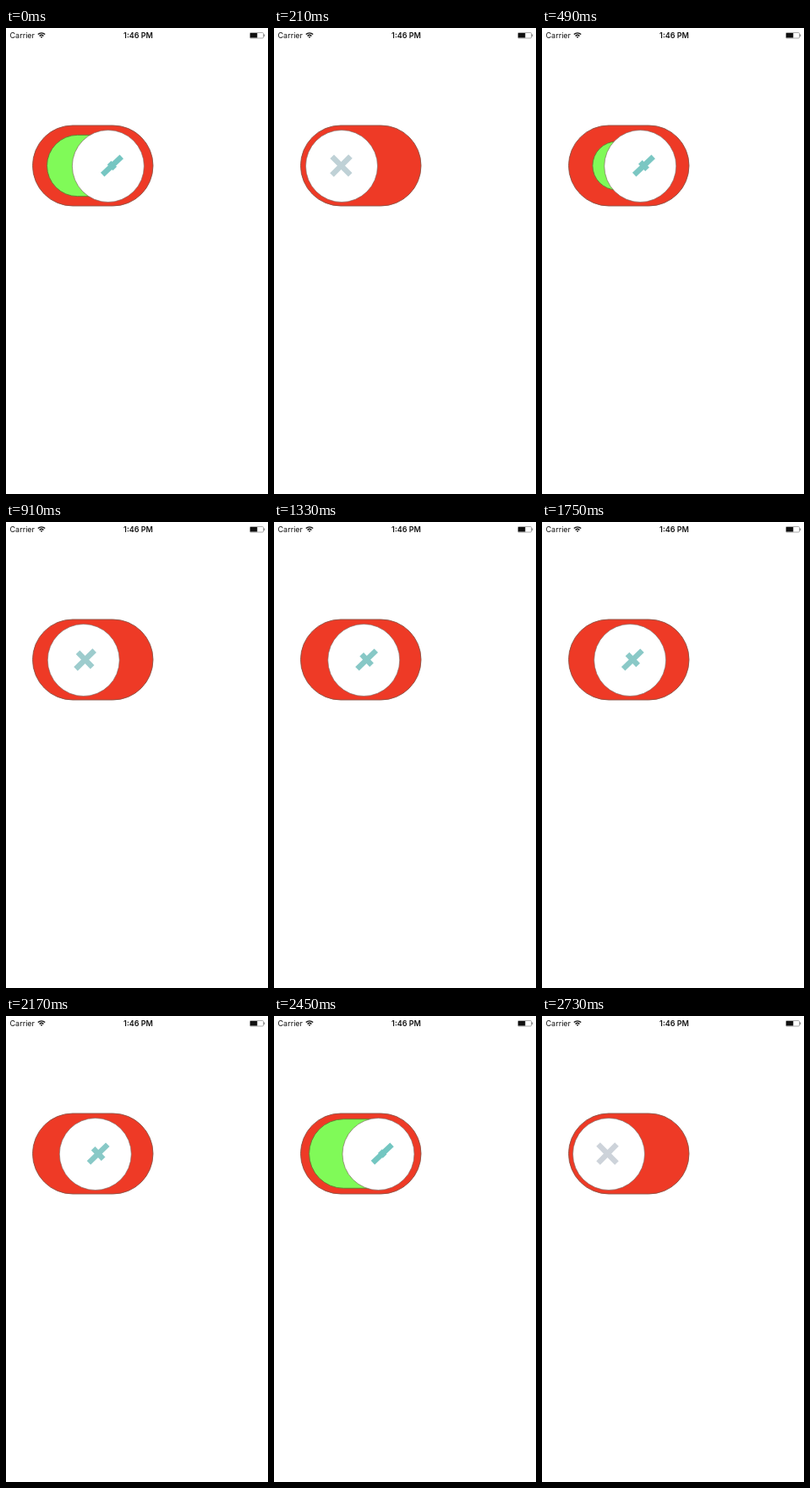
Recreate the animation shown at these times as an HTML page. Size 310 by 550 pixels, loop 2800 ms.

```html
<!DOCTYPE html>
<html lang="en">
<head>
<meta charset="utf-8">
<title>Toggle switch</title>
<style>
  html, body { margin: 0; width: 100%; height: 100%; overflow: hidden; background: #fff; }
  svg { display: block; }
  text { font: 9px Inter, sans-serif; fill: #111; }
</style>
</head>
<body>
<svg width="310" height="550" viewBox="0 0 310 550">
  <text x="4.5" y="12">Carrier</text>
  <text x="156.5" y="12" text-anchor="middle" style="font-weight:600">1:46 PM</text>
  <g fill="none" stroke="#111" stroke-width="1.4">
    <path d="M37.8 7.6a6 6 0 0 1 8.4 0M39.6 9.5a3.4 3.4 0 0 1 4.8 0"/>
    <path d="M42 12l-1.3-1.4a1.9 1.9 0 0 1 2.6 0z" fill="#111" stroke="none"/>
  </g>
  <rect x="288.5" y="5.5" width="16" height="6.5" rx="1" fill="none" stroke="#888" stroke-width=".7"/>
  <rect x="289" y="6" width="8.3" height="5.5" fill="#111"/>
  <path d="M305.7 7.4v2.6" stroke="#777"/>

  <rect x="31.5" y="115" width="142.5" height="95" rx="47.5" fill="#ee3a26" stroke="#8b5548" stroke-width=".9"/>
  <rect id="fill" fill="#80fa58" stroke="#5c812f" stroke-width=".9"/>
  <g id="knob">
    <circle cy="163" r="42.5" fill="#fff" stroke="#806b64" stroke-opacity=".75" stroke-width=".9"/>
  </g>
  <g id="cross" stroke-width="6.5">
    <path d="M-15.5 0h31"/>
    <path id="bar"/>
  </g>
</svg>
<script>
  const LOOP = 2800;
  // Moments at which the knob rests, alternating between on and off
  const turns = [-130, 283, 620, 1109, 1533, 1976, 2351, 2730];
  const [fill, knob, cross, bar] = ['fill', 'knob', 'cross', 'bar'].map(id => document.getElementById(id));

  const mix = (a, b, k) => a + (b - a) * k;
  const ease = u => u < 0.5 ? 4 * u ** 3 : 1 - 4 * (1 - u) ** 3;
  const set = (el, attrs) => {
    for (const name in attrs) el.setAttribute(name, attrs[name]);
  };

  function progress(t) {
    const next = turns.findIndex(turn => turn > t);
    if (next < 0) return 0;
    const start = turns[next - 1];
    const moved = ease((t - start) / (turns[next] - start));
    return next % 2 ? 1 - moved : moved;
  }

  function draw(t) {
    const on = progress(t);
    const scale = on * on;
    const width = 142.5 * scale, height = 95 * scale;
    set(fill, {
      x: 102.75 - width / 2, y: 162.5 - height / 2, width, height, rx: height / 2,
      visibility: scale > 0.01 ? 'visible' : 'hidden'
    });

    const x = mix(79, 127, on);
    set(knob, { transform: `translate(${x})` });

    const tint = Math.sqrt(on);
    const color = [[205, 112], [211, 197], [218, 192]].map(([off, lit]) => mix(off, lit, tint));
    set(cross, {
      transform: `translate(${x + mix(-1.5, 5, tint)} 162.5) rotate(${mix(-45, -43, on)})`,
      stroke: `rgb(${color})`
    });
    const half = mix(15.5, 3.25, on);
    set(bar, { d: `M0 ${-half}V${half}` });
  }

  function tick() {
    draw(performance.now() % LOOP);
    requestAnimationFrame(tick);
  }
  tick();
</script>
</body>
</html>
```
